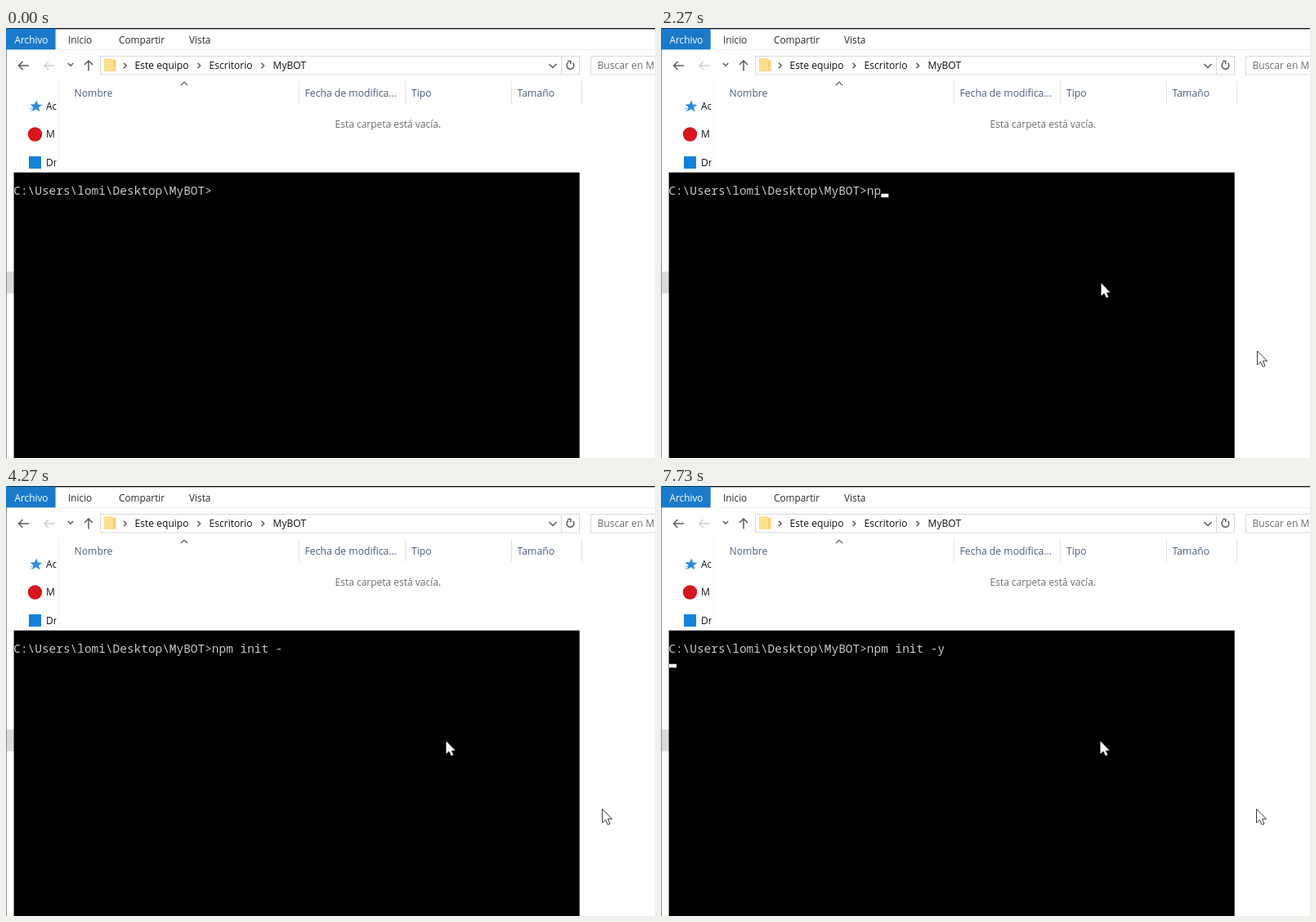
These frames come from a looping animation (794x526 px, 8 s). An HTML page:

```html
<!DOCTYPE html>
<html lang="es">
<head>
<meta charset="utf-8">
<title>Consola</title>
<style>
html, body { margin: 0; width: 100%; height: 100%; overflow: hidden; background: #fff; }
svg { display: block; width: 794px; height: 526px; }
text { font: 12px "Open Sans", "Noto Sans", sans-serif; fill: #111; white-space: pre; }
.tabs text { font-size: 11.8px; fill: #2a2a2a; }
.path text { font-size: 12.1px; }
.head text { font-size: 12.2px; fill: #4c607a; }
text.dim { fill: #6d6d6d; }
text.con { font: 14.44px "Noto Sans Mono", "DejaVu Sans Mono", monospace; fill: #c8c8c8; }
.line { fill: none; stroke: #5c5c5c; stroke-width: 1.5; }
.box { fill: #fff; stroke: #d9d9d9; }

.cover, .caret, .fine, .arrive { animation: 8s step-end infinite; }
.cover { animation-name: type; }
.caret { animation-name: type, enter, blink; }
.arrive { animation-name: arrive; }
.fine { animation-name: nudge; }
.slide { animation: slide 8s linear infinite; }

@keyframes type {
  0% { transform: none; }
  25.87% { transform: translateX(8.66px); }
  27.5% { transform: translateX(17.32px); }
  29.12% { transform: translateX(25.98px); }
  30.87% { transform: translateX(34.64px); }
  37.5% { transform: translateX(43.3px); }
  38.37% { transform: translateX(60.62px); }
  44.12% { transform: translateX(69.28px); }
  45.87% { transform: translateX(77.94px); }
  51.62% { transform: translateX(86.6px); }
  57.5%, 100% { transform: translateX(95.26px); }
}
@keyframes enter { 0% { translate: none; } 59.12%, 100% { translate: -337.3px 15px; } }
@keyframes blink {
  0%, 20%, 33.37%, 40%, 47.5%, 53.37%, 60%, 66.62%, 73.37%, 80%, 86.62%, 93.37% { opacity: 0; }
  16.62%, 23.37%, 37.5%, 43.37%, 50%, 55.87%, 63.37%, 70%, 76.62%, 83.37%, 90%, 96.62%, 100% { opacity: 1; }
}
@keyframes arrive { 0% { opacity: 0; } 10%, 100% { opacity: 1; } }
@keyframes nudge { 0% { transform: none; } 70%, 100% { transform: translateX(-1px); } }
@keyframes slide {
  0%, 13.3% { transform: none; animation-timing-function: ease-in-out; }
  20%, 100% { transform: translateX(-13px); }
}
</style>
</head>
<body>
<svg viewBox="0 0 794 526">
  <defs>
    <clipPath id="side"><rect y="60" width="61.5" height="117"/></clipPath>
    <path id="chev" d="M-2-3.2 1.2 0-2 3.2"/>
    <path id="arrow" d="M6.5 0H-6M-1-5-6 0-1 5"/>
    <path id="mouse" d="M0 0V17L4 13.3 6.8 19.4 9.5 18.2 6.8 12.3H12Z"/>
  </defs>
  <rect width="794" height="526" fill="#fff"/>
  <rect width="794" height="1.4" fill="#15171c"/>
  <rect y="26" width="794" height="1" fill="#f0f0f0"/>
  <rect width="1" height="526" fill="#8b8b8b"/>

  <g class="tabs">
    <rect y=".7" width="60.6" height="25.6" fill="#1979ca"/>
    <text x="10.5" y="19" style="fill:#fff">Archivo</text>
    <text x="76" y="19">Inicio</text>
    <text x="138" y="19">Compartir</text>
    <text x="224" y="19">Vista</text>
  </g>

  <g class="path">
    <rect class="box" x="115.5" y="34.5" width="586" height="22.5"/>
    <path d="M679.5 35V57" stroke="#d9d9d9"/>
    <rect class="box" x="715.5" y="34.5" width="90" height="22.5"/>
    <g class="line">
      <use href="#arrow" x="21.5" y="46"/>
      <use href="#arrow" x="53" y="46" stroke="#cfcfcf"/>
      <use href="#arrow" transform="translate(101 46) rotate(90)"/>
      <use href="#chev" transform="translate(79 45) rotate(90)"/>
      <use href="#chev" x="146" y="46"/>
      <use href="#chev" x="236.5" y="46"/>
      <use href="#chev" x="314.5" y="46"/>
      <path d="M664.5 44 669 48.5 673.5 44M693.5 42.7A4.4 4.4 0 1 1 688 42.2M687 40.5H690.8V44.3"/>
    </g>
    <path d="M120 37.5H131V39H134.5V53H120Z" fill="#f7d273"/>
    <path d="M120 37.5H131V51L134.5 53H120Z" fill="#ffe08a"/>
    <text x="157.5" y="50">Este equipo</text>
    <text x="248.5" y="50">Escritorio</text>
    <text x="326.5" y="50">MyBOT</text>
    <text class="dim" x="723.5" y="50">Buscar en M</text>
  </g>

  <g class="head">
    <path d="M358.5 65V93M488.5 65V93M618.5 65V93M704.5 65V93" stroke="#e4e4e4"/>
    <path d="M64.5 65V177" stroke="#f3f3f3"/>
    <path d="M214 70 218 66 222 70" class="line" style="stroke-width:1.1"/>
    <text x="83.5" y="83.5">Nombre</text>
    <text x="365.5" y="83.5">Fecha de modifica...</text>
    <text x="496" y="83.5">Tipo</text>
    <text x="625.5" y="83.5">Tamaño</text>
  </g>
  <text class="dim" x="402.5" y="121.5">Esta carpeta está vacía.</text>

  <g clip-path="url(#side)">
    <path d="M37.5 88.5 39 93.5 44.5 94 40 97 41.5 102.5 36.8 99.2 32 102 33.4 97 29.5 93.5 34.8 93.3Z" fill="#2d8fdd"/>
    <path d="M29 98.5H33M29.5 101H32" stroke="#7dbcec"/>
    <circle cx="35.5" cy="130" r="8.7" fill="#d9161c"/>
    <rect x="28" y="157" width="15" height="15" fill="#1482dc"/>
    <text x="49" y="99.5">Acc</text>
    <text x="49" y="134">M</text>
    <text x="49" y="168.5">Dr</text>
  </g>

  <rect x="1" y="298" width="9" height="26.5" fill="#d9d9d9"/>
  <rect x="9.6" y="176.7" width="692.1" height="350"/>
  <text class="con" x="9.3" y="204">C:\Users\lomi\Desktop\MyBOT&gt;npm init -y</text>
  <rect class="cover" x="251.5" y="190" width="110" height="19"/>
  <rect class="caret" x="252" y="202.7" width="9" height="4.5" fill="#fff"/>

  <g class="arrive">
    <g class="fine">
      <use href="#mouse" transform="translate(538.5 312) scale(.93)" fill="#fff"/>
      <g class="slide">
        <use href="#mouse" x="742.5" y="395" fill="#fff" stroke="#3a3a42"/>
      </g>
    </g>
  </g>
</svg>
</body>
</html>
```
